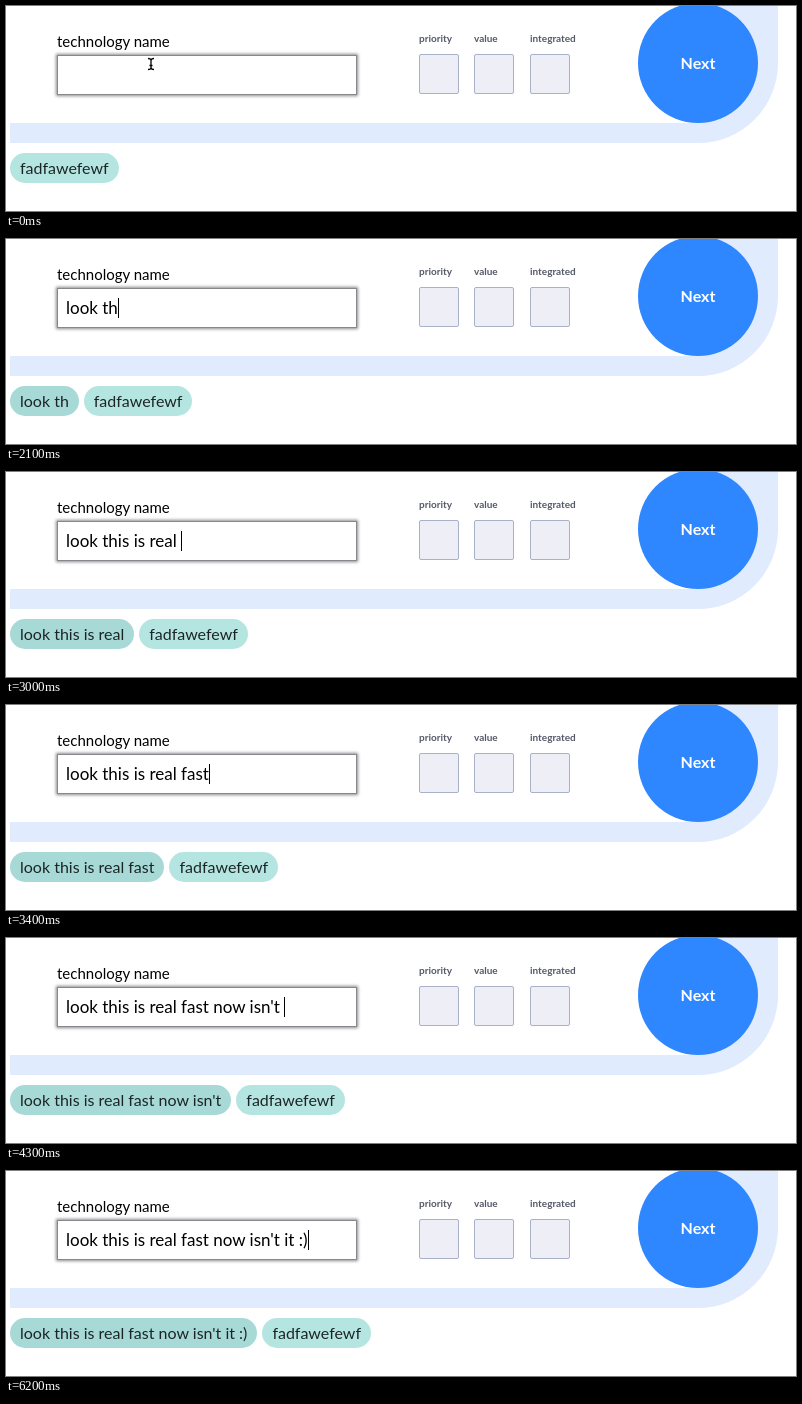
These frames come from a looping animation (790x205 px, 6300 ms). An HTML page:

```html
<!DOCTYPE html>
<html lang="en">
<head>
<meta charset="utf-8">
<style>
  html, body { margin: 0; width: 100%; height: 100%; overflow: hidden; background: #fff; }
  body { position: relative; font-family: Lato, sans-serif; color: #000; }
  body > * { position: absolute; box-sizing: border-box; white-space: pre; }
  .panel { left: 4px; top: 0; width: 768px; height: 137px; border-radius: 0 0 80px 0; background: #e0ebfe; }
  .sheet { left: 4px; top: 0; width: 688px; height: 117px; background: #fff; }
  .next { left: 632px; top: -3px; width: 120px; height: 120px; border-radius: 50%; background: #2e87ff;
    color: #fff; font: bold 16px/120px Lato, sans-serif; text-align: center; }
  .title { left: 51px; top: 26px; font-size: 15px; line-height: 18px; }
  .field { left: 51px; top: 49px; width: 300px; height: 40px; border: 1px solid #88888c;
    background: #fff; box-shadow: 0 0 3px 1px #8a8a8e; }
  .typed { left: 60px; top: 59px; font-size: 17px; line-height: 20px; height: 20px; }
  .caret { position: absolute; left: 100%; top: 0; width: 1px; height: 20px; background: #000; }
  .option { top: 26px; font: bold 10px/12px Lato, sans-serif; color: #555a68; }
  .option::after { content: ""; position: absolute; left: 0; top: 22px; width: 38px; height: 38px;
    border: 1px solid #a8b1c7; border-radius: 2px; background: #eeeff6; }
  .chips { left: 4px; top: 147px; display: flex; gap: 5px; }
  .chip { padding: 0 10px; border-radius: 15px; background: #b5e5e0; color: #1c2526;
    font-size: 16px; line-height: 30px; }
  .active { background: #a7d9d7; }
  .pointer { left: 139px; top: 50px; }
</style>
</head>
<body>
  <div class="panel"></div>
  <div class="sheet"></div>
  <div class="next">Next</div>
  <div class="title">technology name</div>
  <div class="field"></div>
  <div class="typed"><span id="text"></span><i class="caret" id="caret"></i></div>
  <div class="option" style="left:413px">priority</div>
  <div class="option" style="left:468px">value</div>
  <div class="option" style="left:524px">integrated</div>
  <div class="chips"><span class="chip active" id="draft"></span><span class="chip">fadfawefewf</span></div>
  <svg class="pointer" id="pointer" width="12" height="16" fill="none" stroke="#000" stroke-width="1.3">
    <path d="M3 2.5Q6 2.5 6 4.5Q6 2.5 9 2.5M6 4V12M3 13.5Q6 13.5 6 11.5Q6 13.5 9 13.5M4.5 9.5H7.5"/>
  </svg>
<script>
const LOOP = 6300;
const MESSAGE = "look this is real fast now isn't it :)";
// [time in ms, characters typed]
const PACE = [[1300, 1], [1600, 2], [2300, 9], [2500, 10], [3000, 18], [3800, 26],
              [4300, 33], [4600, 36], [4800, 37], [5100, 38]];
const CARET_ON = [[200, 700], [1200, 5600], [6100, LOOP]];
const [text, caret, draft, pointer] =
  ["text", "caret", "draft", "pointer"].map(id => document.getElementById(id));

function typedCount(t) {
  if (t < PACE[0][0]) return 0;
  const next = PACE.findIndex(([time]) => time > t);
  if (next < 0) return MESSAGE.length;
  const [t0, n0] = PACE[next - 1], [t1, n1] = PACE[next];
  return Math.floor(n0 + (n1 - n0) * (t - t0) / (t1 - t0) + 1e-6);
}

function show(element, visible) {
  element.style.display = visible ? "" : "none";
}

function draw(now) {
  const t = Math.floor(now % LOOP / 100) * 100;
  const typed = MESSAGE.slice(0, typedCount(t));
  text.textContent = typed;
  draft.textContent = typed.trimEnd();
  show(draft, typed);
  show(pointer, !typed);
  show(caret, CARET_ON.some(([from, to]) => t >= from && t < to));
  requestAnimationFrame(draw);
}
draw(0);
</script>
</body>
</html>
```
